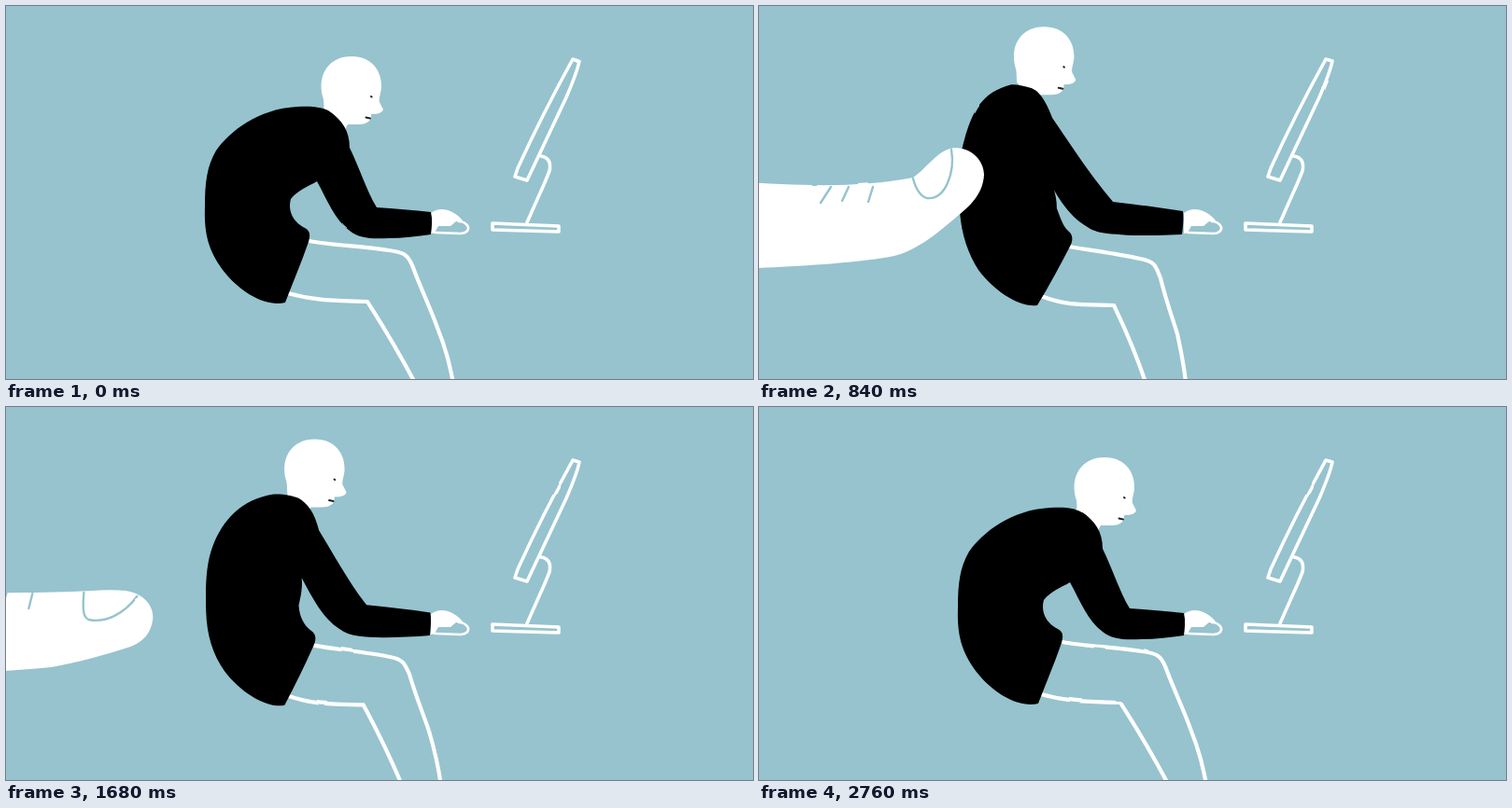
Animation, 800 px wide and 400 px high, one loop 2840 ms. Source, as an HTML page:

```html
<!DOCTYPE html>
<html lang="en">
<head>
<meta charset="utf-8">
<title>Posture</title>
<style>
  html, body { margin: 0; height: 100%; overflow: hidden; background: #96c3ce; }
  svg { display: block; width: 100%; height: 100%; }
  .line { fill: none; stroke: #fff; stroke-width: 3.6; stroke-linecap: round; stroke-linejoin: round; }
  .crease { fill: none; stroke: #96c3ce; stroke-width: 2.4; stroke-linecap: round; }
  .face { fill: none; stroke: #222; stroke-width: 2; stroke-linecap: round; }
</style>
</head>
<body>
<svg viewBox="0 0 800 400">
  <filter id="wobble" filterUnits="userSpaceOnUse" x="-20" y="-20" width="840" height="440" color-interpolation-filters="sRGB">
    <feTurbulence id="noise" type="fractalNoise" baseFrequency=".04" result="n"/>
    <feDisplacementMap in="SourceGraphic" in2="n" scale="2" xChannelSelector="R" yChannelSelector="G"/>
    <feGaussianBlur stdDeviation=".5"/>
  </filter>
  <g filter="url(#wobble)">
    <g class="line">
      <path d="M607 57L614 59Q612 70 600 98L558 187L545 183L548 174Q575 115 607 57Z"/>
      <path d="M573 161Q585 163 582 177Q577 190 570 205L558 232"/>
      <path d="M521 233L592 236L592 242L521 240Z"/>
      <path id="legs" stroke-width="4.2"/>
    </g>
    <path fill="#fff" d="M455 222C462 217 470 217 478 221C484 224 488 228 490 232L482 231L476 236L463 236L459 243L455 244Z"/>
    <path class="line" style="stroke-width:2.6" d="M458 238Q456 243 461 243L487 244Q496 243 495 237Q492 231 485 231"/>
    <g id="head">
      <path fill="#fff" d="M341 114C340 106 341 102 339 97C333 72 347 54 370 54C392 54 403 70 402 88C401 95 399 100 400 103L404 111Q403 116 391 116C392 122 388 127 377 127L366 127L362 134Z"/>
      <path class="face" d="M385.500 119.500L390 120.500M391 97L391.600 97.500"/>
    </g>
    <path id="coat"/>
    <g id="finger">
      <path id="skin" fill="#fff"/>
      <path id="creases" class="crease"/>
    </g>
  </g>
</svg>
<script>
const LOOP = 2840;
const el = id => document.getElementById(id);

// Each shape is a pair of matching paths: slouched/straight, or flat/bent for the finger.
const shapes = {
  coat: [
    `M312 108C330 107 338 109 345 112C360 122 368 134 368 152C378 172 386 198 397 216
     C416 217 436 219 455 221C457 229 456 237 455 245C440 247 425 249 410 249
     C390 250 378 249 368 241C352 229 345 210 333 188C323 194 313 197 305 207
     C301 222 310 233 320 238C326 241 326 246 324 253C316 276 307 297 299 318
     C280 323 252 309 232 283C217 262 212 245 213 215C213 190 215 172 225 155C239 135 270 110 312 108Z`,
    `M270 84C278 84 285 86 292 88C299 91 306 99 314 120C332 146 352 178 379 210
     C404 213 429 216 454 220C455 228 454 237 453 245C436 246 416 246 400 246
     C378 244 362 245 350 236C330 224 318 202 306 180C314 190 319 201 319 217
     C323 227 325 235 331 241C336 245 337 250 333 258C322 279 311 300 298 321
     C280 324 252 306 235 283C224 266 217 245 215 221C214 195 213 166 220 143C228 114 238 92 270 84Z`],
  legs: [
    `M325 252C350 257 380 257 410 262C425 264 430 266 435 278C445 305 455 325 462 345C472 370 475 385 479 404
     M302 308C330 316 350 316 387 317C395 330 410 352 438 404`,
    `M332 258C355 262 385 266 408 271C425 274 425 280 430 292C437 320 443 335 448 352C453 375 455 385 457 404
     M302 311C330 322 350 320 380 321C388 338 400 362 414 404`],
  skin: [
    `M-150 196C-100 198 80 201 155 198C175 197 195 195 212 197C230 200 242 212 241 227
     C239 243 230 252 217 257C190 266 160 274 132 279C90 283 40 285 0 290L-150 305Z`,
    `M-150 180C0 189 80 200 165 184C180 174 192 153 210 152C228 152 241 166 241 181
     C240 200 228 213 214 224C190 245 165 265 140 269C100 276 40 279 0 281L-150 286Z`],
  creases: [
    `M167 199C166 212 165 225 172 228C190 232 210 222 224 203M65 200L54 217M84 200L79 216M112 200L108 216`,
    `M165 185C168 197 174 205 180 206C200 208 210 178 206 154M77 194L66 211M96 194L89 209M122 194L117 210`]
};

const span = (t, a, b) => Math.min(1, Math.max(0, (t - a) / (b - a)));
const smooth = u => u * u * (3 - 2 * u);
const easeOut = (u, power) => 1 - (1 - u) ** power;

function morph(id, k) {
  const [from, to] = shapes[id];
  const ends = to.match(/-?\d+/g);
  let i = 0;
  el(id).setAttribute('d', from.replace(/-?\d+/g, n => (+n + (ends[i++] - n) * k).toFixed(2)));
}
const move = (id, x, y) => el(id).setAttribute('transform', `translate(${x} ${y})`);

function draw(time) {
  // Drawn on a 40 ms beat, slowing to 80 ms for the rest at the end.
  const t = time < 2280 ? Math.floor(time / 40) * 40 : 2280 + Math.floor((time - 2280) / 80) * 80;
  const upright = easeOut(span(t, 220, 860), 1.5) - smooth(span(t, 1380, 2080));
  const bend = smooth(span(t, 340, 840)) - smooth(span(t, 1280, 1640));
  const reach = easeOut(span(t, 60, 340), 2) - span(t, 1300, 1970) ** 2;

  morph('coat', upright);
  morph('legs', upright);
  morph('skin', bend);
  morph('creases', bend);
  move('head', -65 * upright, -32 * upright);
  move('finger', 260 * (reach - 1), 0);
  el('noise').setAttribute('seed', t / 40 % 9 + 1);
}

function tick() {
  draw(performance.now() % LOOP);
  requestAnimationFrame(tick);
}
tick();
</script>
</body>
</html>
```
